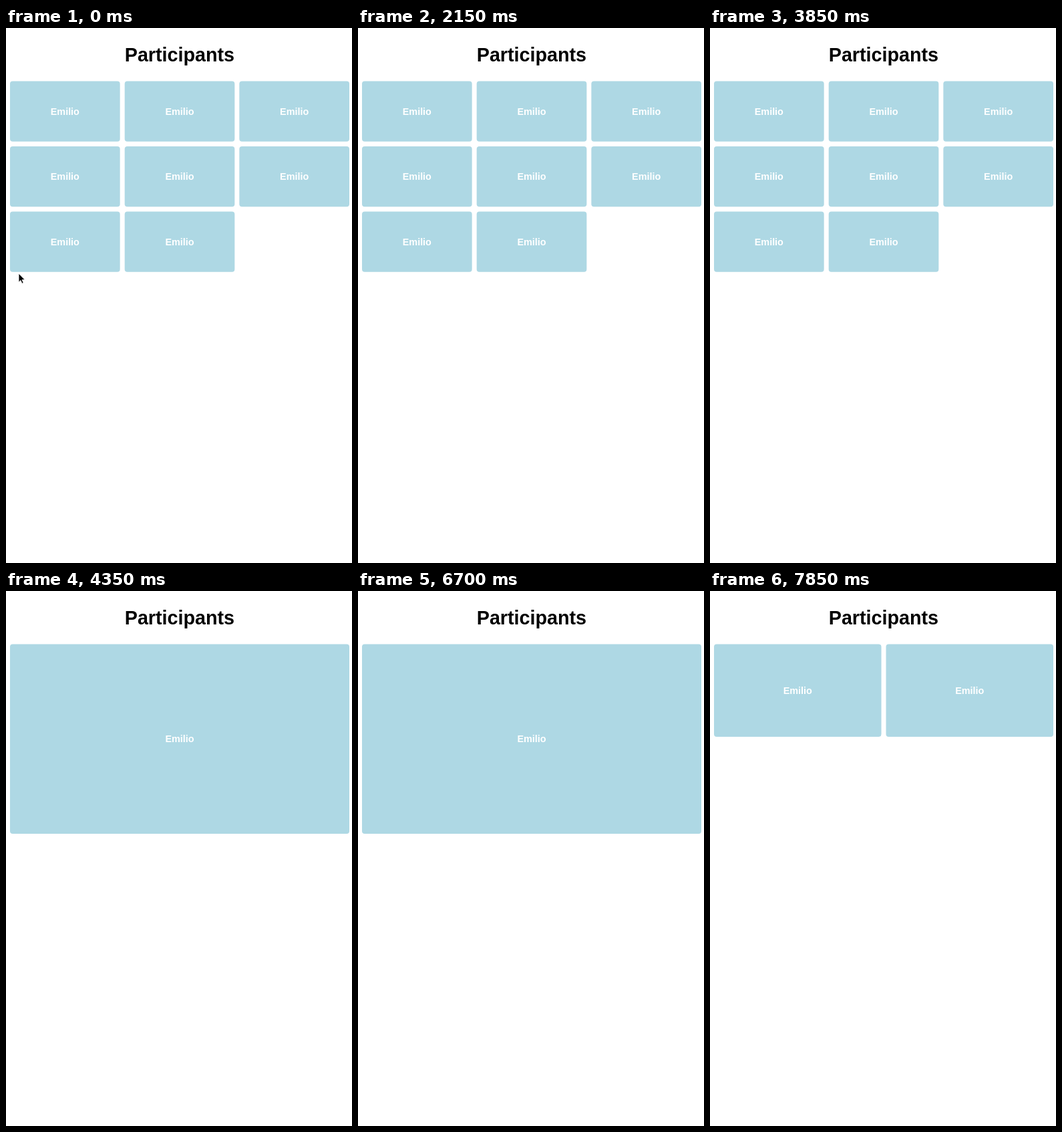
These frames come from a looping animation (518x800 px, 8000 ms). An HTML page:

```html
<!DOCTYPE html>
<html lang="en">
<head>
<meta charset="utf-8">
<title>Participants</title>
<style>
  html, body { margin: 0; width: 100%; height: 100%; overflow: hidden; background: #fff; }
  svg { display: block; width: 518px; height: 800px; }
  text { font-family: "Liberation Sans", Arial, sans-serif; font-weight: bold; text-anchor: middle; }
  .title { font-size: 28.7px; }
  .tile rect { fill: #aed8e4; }
  .tile text { font-size: 14.4px; fill: #fff; }
</style>
</head>
<body>
<svg viewBox="0 0 518 800">
  <text class="title" x="259.9" y="50">Participants</text>
  <g id="tiles"></g>
  <path id="cursor" d="M19 367v13.2l3-2.8 2 4.8 2.2-.9-2-4.7h4.1z" fill="#000" stroke="#fff" stroke-width=".9"/>
</svg>
<script>
const LOOP = 8000, LEFT = 6, TOP = 79.5, WIDTH = 508, GAP = 7;
const NAME = "Emilio";
const layouts = [
  { from: 0, count: 8, columns: 3, height: 90.3 },
  { from: 4200, count: 1, columns: 1, height: 283.5 },
  { from: 6750, count: 2, columns: 2, height: 138.5 },
];
const tiles = document.getElementById("tiles");
const cursor = document.getElementById("cursor");
let shown;

function tile(index, { columns, height }) {
  const width = (WIDTH - GAP * (columns - 1)) / columns;
  const x = LEFT + (index % columns) * (width + GAP);
  const y = TOP + Math.floor(index / columns) * (height + GAP + 0.2);
  return `<g class="tile"><rect x="${x}" y="${y}" width="${width}" height="${height}" rx="4"/>
    <text x="${x + width / 2}" y="${y + height / 2 + 5}">${NAME}</text></g>`;
}

function draw(now) {
  const time = now % LOOP;
  const layout = layouts.findLast(({ from }) => time >= from);
  if (layout !== shown) {
    tiles.innerHTML = Array.from({ length: layout.count }, (_, i) => tile(i, layout)).join("");
    shown = layout;
  }
  cursor.style.display = time < 50 ? "" : "none";
}

const start = performance.now();
function tick() {
  draw(performance.now() - start);
  requestAnimationFrame(tick);
}
tick();
</script>
</body>
</html>
```
